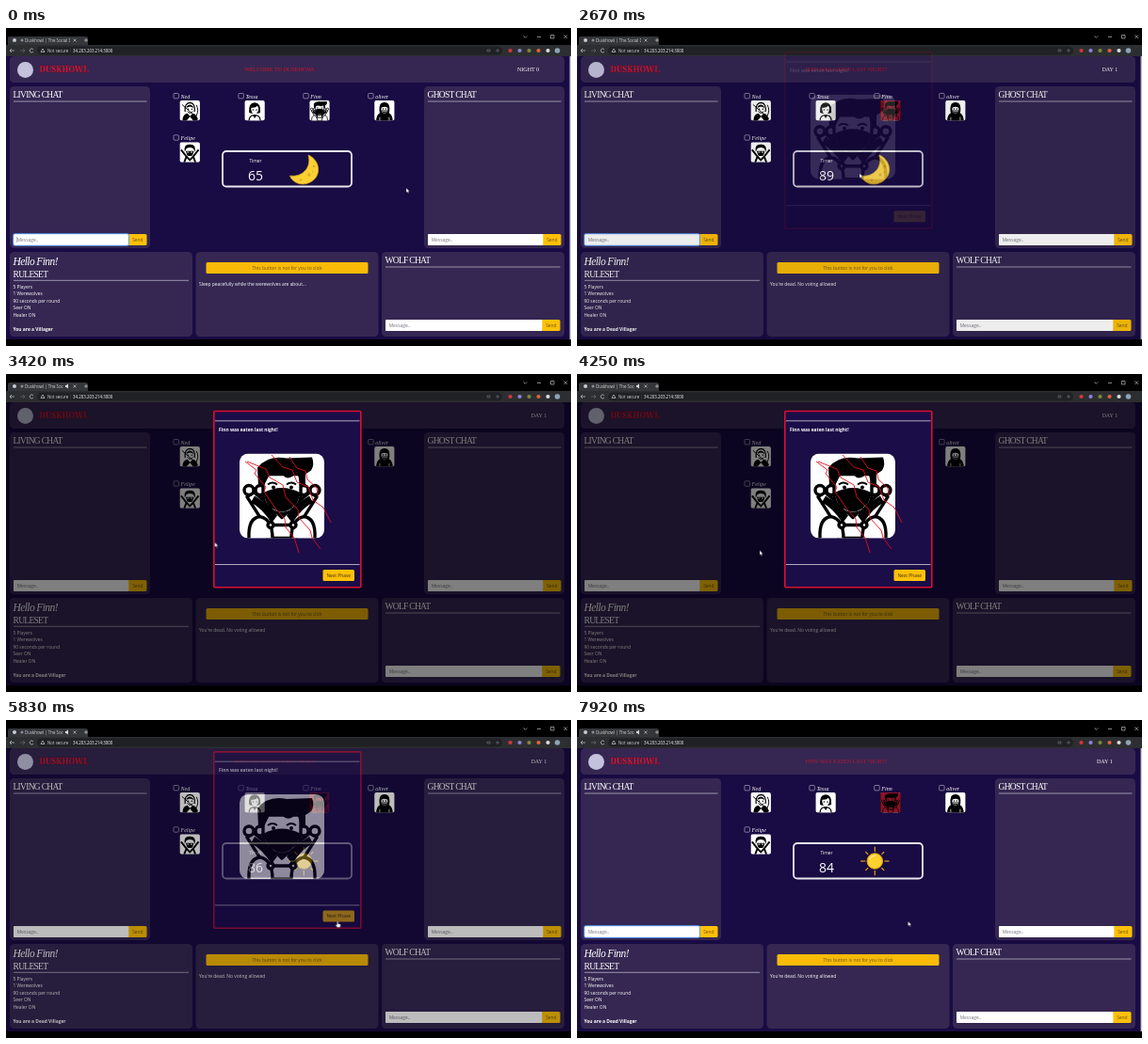
These frames come from a looping animation (600x338 px, 8000 ms). An HTML page:

```html
<!DOCTYPE html>
<html lang="en">
<head>
<meta charset="utf-8">
<title>Duskhowl</title>
<style>
  html, body { margin: 0; width: 100%; height: 100%; overflow: hidden; background: #000; }
  svg#stage { display: block; width: 100vw; height: 100vh; }
  text { font: 4.9px "Open Sans", "Noto Sans", sans-serif; fill: #fff; }
  .chrome text { font-size: 4.4px; fill: #d6d6d9; }
  .head { font: 9.5px "Liberation Serif", serif; letter-spacing: -.7px; }
  .hello { font: italic 11.5px "Liberation Serif", serif; letter-spacing: -.6px; }
  .name { font: italic 6px "Liberation Serif", serif; }
  .notice, .phase { font: 6px "Liberation Serif", serif; }
  .notice { fill: #d3132b; text-anchor: middle; animation: pulse 1.6s ease-in-out infinite alternate; }
  .logo { font: 900 8.5px "Noto Serif", serif; fill: #e4203c; stroke: #7a0820; stroke-width: .3px; }
  .bold { font-weight: 700; }
  .mid { text-anchor: middle; }
  .hint { fill: #777480; }
  .onGold { fill: #6b5210; }
  .digits text { font-size: 14px; text-anchor: middle; }

  .night, .day, .moon, .sun, .focus, .sound, .hand, .arrow, .dayShift, .bar { animation: 8s step-end infinite; }
  .night { animation-name: night; }
  .day { animation-name: day; }
  .moon { animation-name: moon; }
  .sun { animation-name: sun; }
  .focus, .bar { animation-name: focus; }
  .sound { animation-name: sound; }
  .hand { animation-name: hand; }
  .arrow { animation-name: arrow; }
  .dayShift { animation-name: dayShift; }
  .digits { animation: count 8s step-end infinite; }
  .caret { animation: blink 1s step-end infinite; }
  .backdrop { animation: shade 8s linear infinite; }
  .fade { animation: fade 8s linear infinite; }
  .drop { animation: drop 8s ease-out infinite; }
  .claws { animation: claws 8s linear infinite; }
  .pointer { animation: pointer 8s ease-in-out infinite; }

  @keyframes pulse { to { opacity: .82; } }
  @keyframes night { 0% { visibility: visible; } 32.25%, 100% { visibility: hidden; } }
  @keyframes day { 0% { visibility: hidden; } 32.25%, 100% { visibility: visible; } }
  @keyframes moon { 0% { visibility: visible; } 34.5%, 100% { visibility: hidden; } }
  @keyframes sun { 0% { visibility: hidden; } 34.5%, 100% { visibility: visible; } }
  @keyframes focus { 0% { visibility: visible; } 34.2% { visibility: hidden; } 75.75%, 100% { visibility: visible; } }
  @keyframes sound { 0% { visibility: hidden; } 36.5%, 100% { visibility: visible; } }
  @keyframes hand { 0% { visibility: hidden; } 69% { visibility: visible; } 75.5%, 100% { visibility: hidden; } }
  @keyframes arrow { 0% { visibility: visible; } 69% { visibility: hidden; } 75.5%, 100% { visibility: visible; } }
  @keyframes dayShift { 0% { transform: none; } 32.25% { transform: translateX(5.5px); } 75.75%, 100% { transform: none; } }
  @keyframes blink { 50%, 100% { opacity: 0; } }
  @keyframes count {
    0% { transform: none; }
    7.25% { transform: translateY(-20px); }
    19.75% { transform: translateY(-40px); }
    32.25% { transform: translateY(-60px); }
    44.75% { transform: translateY(-80px); }
    57.25% { transform: translateY(-100px); }
    69.75% { transform: translateY(-120px); }
    82.25% { transform: translateY(-140px); }
    94.75%, 100% { transform: translateY(-160px); }
  }
  @keyframes shade { 0%, 33.125% { opacity: 0; } 35%, 72% { opacity: .5; } 73.875%, 100% { opacity: 0; } }
  @keyframes fade { 0%, 33.125% { opacity: 0; } 35%, 72% { opacity: 1; } 73.875%, 100% { opacity: 0; } }
  @keyframes drop {
    0%, 33.125% { transform: translateY(-15.6px); }
    36.875%, 72% { transform: none; }
    75.75%, 100% { transform: translateY(-15.6px); }
  }
  @keyframes claws { 0%, 33.5% { opacity: 0; } 38%, 58% { opacity: 1; } 62.5%, 100% { opacity: 0; } }
  @keyframes pointer {
    0%, 6% { transform: translate(425px, 170px); }
    14%, 23% { transform: translate(450px, 180px); }
    31%, 35% { transform: translate(300px, 154.5px); }
    47%, 57% { transform: translate(194px, 187.5px); }
    68%, 100% { transform: translate(351.5px, 214px); }
  }
</style>
</head>
<body>
<svg id="stage" viewBox="0 0 600 338" preserveAspectRatio="none">
  <defs>
    <clipPath id="reel"><rect x="250" y="147" width="30" height="19"/></clipPath>
    <clipPath id="card"><rect width="90" height="90" rx="9"/></clipPath>

    <symbol id="masked" viewBox="0 0 90 90"><g clip-path="url(#card)">
      <rect width="90" height="90" fill="#fff"/>
      <g stroke="#000" stroke-width="3.4" stroke-linejoin="round" fill="#fff">
        <path d="M8 46 L15 41 L33 56 L45 68 L57 56 L75 41 L82 46 L68 68 L60 90 H30 L22 68Z"/>
        <circle cx="22" cy="39" r="5"/><circle cx="68" cy="39" r="5"/>
        <path d="M25 22 V46 Q28 62 45 64 Q62 62 65 46 V22Z"/>
        <circle cx="10" cy="39" r="5"/><circle cx="80" cy="39" r="5"/>
        <path d="M10 90 Q9 68 22 67 Q35 70 35 90 M80 90 Q81 68 68 67 Q55 70 55 90"/>
        <path d="M35 76 H55" /><circle cx="33" cy="76" r="3"/><circle cx="57" cy="76" r="3"/>
      </g>
      <path d="M20 34 L19 15 Q30 1 50 5 L77 4 Q80 12 76 18 L70 22 V34 L65 33 L61 20 Q52 30 46 23 Q38 19 32 22 L26 34Z"/>
      <path d="M25 42 Q45 31 65 42 L61 53 Q45 71 29 53Z M16 45 L34 57 L40 66 L34 74Q24 58 12 52Z M74 45 L56 57 L50 66 L56 74Q66 58 78 52Z"/>
      <path d="M30 33 q5 -4 10 0 M50 33 q5 -4 10 0" fill="none" stroke="#000" stroke-width="2"/>
      <circle cx="36" cy="36" r="2"/><circle cx="55" cy="36" r="2"/>
    </g></symbol>

    <symbol id="archer" viewBox="0 0 90 90"><g clip-path="url(#card)">
      <rect width="90" height="90" fill="#fff"/>
      <path d="M24 50 Q20 12 46 10 Q70 12 66 50" fill="#fff" stroke="#000" stroke-width="5"/>
      <path d="M30 34 Q46 20 62 34 L59 26 Q46 12 31 26Z M12 90 Q14 60 34 58 L46 70 L58 58 Q78 60 80 90Z"/>
      <path d="M34 48 q12 16 24 0 M10 18 L82 82 M74 20 Q88 44 72 72" fill="none" stroke="#000" stroke-width="4"/>
      <path d="M30 90 L46 72 L60 90Z" fill="#fff"/>
      <circle cx="38" cy="39" r="3"/><circle cx="54" cy="39" r="3"/>
    </g></symbol>

    <symbol id="girl" viewBox="0 0 90 90"><g clip-path="url(#card)">
      <rect width="90" height="90" fill="#fff"/>
      <path d="M20 54 Q16 10 45 9 Q74 10 70 54 L60 58 H30Z"/>
      <path d="M29 32 Q50 34 56 24 L62 34 Q62 58 45 60 Q28 58 29 32Z" fill="#fff"/>
      <path d="M20 90 Q20 66 45 65 Q70 66 70 90" fill="#fff" stroke="#000" stroke-width="5"/>
      <path d="M36 66 L45 80 L54 66Z"/>
      <circle cx="38" cy="42" r="3"/><circle cx="53" cy="42" r="3"/>
    </g></symbol>

    <symbol id="hooded" viewBox="0 0 90 90"><g clip-path="url(#card)">
      <rect width="90" height="90" fill="#fff"/>
      <path d="M8 90 Q10 62 24 56 Q16 8 45 8 Q74 8 66 56 Q80 62 82 90Z"/>
      <path d="M31 32 Q45 24 59 32 Q62 54 45 58 Q28 54 31 32Z" fill="#fff"/>
      <path d="M32 44 H58 Q56 56 45 57 Q34 56 32 44Z"/>
      <path d="M36 49 H54 M24 90 V74 M66 90 V74" stroke="#fff" stroke-width="3"/>
      <circle cx="39" cy="38" r="3"/><circle cx="51" cy="38" r="3"/>
    </g></symbol>

    <symbol id="bandit" viewBox="0 0 90 90"><g clip-path="url(#card)">
      <rect width="90" height="90" fill="#fff"/>
      <path d="M22 44 Q16 8 45 10 Q74 8 68 44 L60 28 Q45 20 30 28Z"/>
      <path d="M27 40 H63 L57 58 Q45 66 33 58Z"/>
      <path d="M6 34 L30 64 L20 90 M84 34 L60 64 L70 90 M30 64 L45 80 L60 64" fill="none" stroke="#000" stroke-width="8"/>
      <path d="M33 45 h9 M48 45 h9" stroke="#fff" stroke-width="4"/>
    </g></symbol>
  </defs>

  <rect width="600" height="338"/>

  <g class="chrome">
    <path d="M2 18 V11 Q2 9 4 9 H84 Q87 9 87 11 V18Z" fill="#35363a"/>
    <rect y="18" width="600" height="12" fill="#2d2e31"/>
    <rect x="33" y="19.5" width="494" height="9" rx="4.5" fill="#202124"/>
    <circle cx="9" cy="13" r="2" fill="#c9c9d2"/><circle cx="17" cy="13" r="1.5" fill="#8c8ca0"/>
    <svg x="20" y="8" width="48" height="10"><text x="0" y="6.5">Duskhowl | The Social Deduction</text></svg>
    <g class="sound"><rect x="61" y="9.5" width="8" height="8" fill="#35363a"/><path d="M63 12 h1 l2 -1.5 v5 l-2 -1.5 h-1z" fill="#ddd"/></g>
    <path d="M71.5 11.5 l3 3 m0 -3 l-3 3 M83 13 h4 M85 11 v4 M549.5 8.5 l1.8 1.8 l1.8 -1.8 M564 9.5 h4 M578.5 7.5 h3.5 v3.5 h-3.5z M592.5 7.5 l3.5 3.5 m0 -3.5 l-3.5 3.5" fill="none" stroke="#ddd" stroke-width=".6"/>
    <path d="M4 24 h5 M6 22 l-2 2 l2 2 M29 23 a2 2 0 1 0 0 2 M37 25.5 l2 -3.5 l2 3.5z" fill="none" stroke="#ccc" stroke-width=".7"/>
    <path d="M15 24 h5 M18 22 l2 2 l-2 2 M511 23 h3 v2 h-3z M520 24 h4 M522 22 v4" fill="none" stroke="#77787c" stroke-width=".6"/>
    <text x="44" y="25.6">Not secure</text><path d="M68.5 21.5 v5" stroke="#555" stroke-width=".4"/>
    <text x="71" y="25.6" style="fill:#fff">34.203.203.214:3000</text>
    <g id="extensions"></g>
  </g>

  <rect y="30" width="600" height="301" fill="#190b43"/>
  <rect class="bar" x="598.6" y="30" width="1.4" height="301" fill="#cfcfd6"/>
  <g id="panels" fill="#352752"></g>

  <circle cx="20.5" cy="44.5" r="8.5" fill="#c3c1dc"/>
  <text class="logo" x="35.5" y="47">DUSKHOWL</text>
  <g class="night">
    <text class="notice" x="291" y="46">WELCOME TO DUSKHOWL</text>
    <text class="phase" x="543" y="46">NIGHT 0</text>
    <text class="bold" x="7.5" y="322">You are a Villager</text>
    <text x="205" y="273.5">Sleep peacefully while the werewolves are about...</text>
  </g>
  <g class="day">
    <text class="notice" x="286" y="46">FINN WAS EATEN LAST NIGHT!</text>
    <text class="phase dayShift" x="552" y="46">DAY 1</text>
    <text class="bold" x="7.5" y="322">You are a Dead Villager</text>
    <text x="205" y="273.5">You're dead. No voting allowed</text>
  </g>

  <g id="chats"></g>
  <rect class="focus" x="7.7" y="218.7" width="122.6" height="12.6" rx="1.5" fill="none" stroke="#5b9bf5" stroke-width="1"/>
  <g class="focus"><path class="caret" d="M11.2 222 v6" stroke="#222" stroke-width=".4"/></g>

  <text class="hello" x="7.5" y="251.5">Hello Finn!</text>
  <text class="head" x="7.5" y="264.5">RULESET</text>
  <path d="M8 268.3 H194" stroke="#c9c5d4" stroke-width=".7"/>
  <g id="rules"></g>

  <rect x="212.5" y="249" width="172" height="12" rx="1.5" fill="#f9bb08"/>
  <text class="mid onGold" x="298.5" y="256.8">This button is not for you to click</text>

  <g id="players"></g>

  <rect x="230" y="131" width="137" height="37.5" rx="4" fill="none" stroke="#e9e8ee" stroke-width="1.8"/>
  <text class="mid" x="265" y="143">Timer</text>
  <g clip-path="url(#reel)"><g class="digits" id="digits"></g></g>
  <g class="moon">
    <path d="M321 135 C335 141 336 161 319 165.5 C310 167.5 303 162 301.5 157 C313 159 325 150 321 135Z" fill="#fbd034" stroke="#d7a21c" stroke-width=".8"/>
    <g fill="#dfa92a"><circle cx="327" cy="147" r="1.3"/><circle cx="322" cy="156" r="1.7"/><circle cx="313" cy="161.5" r="1.3"/><circle cx="326" cy="153" r=".8"/></g>
  </g>
  <g class="sun">
    <g id="rays" stroke="#f0ae1c" stroke-width="1.1"></g>
    <circle cx="316.3" cy="150" r="8.3" fill="#fdd02b" stroke="#e39b14" stroke-width=".9"/>
    <path d="M311 148 q2 -4 6 -4" fill="none" stroke="#fff0a0" stroke-width="1.2"/>
  </g>

  <rect class="backdrop" y="30" width="600" height="301"/>
  <g class="fade"><g class="drop">
    <rect x="220.8" y="39.5" width="156" height="187.3" rx="1" fill="#1b0d47" stroke="#d90f34" stroke-width="1.6"/>
    <path d="M222 49.8 H375.5 M222 202.5 H375.5" stroke="#d5d2df" stroke-width=".8"/>
    <text class="bold" x="226" y="60.8">Finn was eaten last night!</text>
    <use href="#masked" x="248" y="84.3" width="90" height="90.5"/>
    <g class="claws" fill="none" stroke="#e0101c" stroke-width=".9">
      <path d="M254 93 l12 9 l-2 4 l12 14 l-2 5 l13 19 l9 10 l1 9 l9 11 l5 16"/>
      <path d="M256 93 l20 8 l4 9 l14 8 l3 13 l13 13 l1 9 l12 13 l2 8 l9 12"/>
      <path d="M282 86 l12 13 l10 3 l5 13 l12 5 l5 14 l11 8 l8 16"/>
      <path d="M301 88 l8 12 l9 3 l2 9 l10 9 l1 8"/>
    </g>
    <rect x="336.5" y="208" width="33.5" height="12" rx="1.5" fill="#ffc107"/>
    <text class="mid" x="353.2" y="215.8" style="fill:#3c2f08">Next Phase</text>
  </g></g>

  <g class="pointer">
    <path class="arrow" d="M0 0 V5 L1.2 4 L2 5.8 L2.9 5.4 L2.1 3.7 L3.6 3.6Z" fill="#fff" stroke="#000" stroke-width=".3"/>
    <path class="hand" d="M0 0 q.8 -.6 1.2 .2 V2.4 L3.4 3 Q4 3.3 3.8 4.4 L3.2 6.6 H.3 L-1.4 4 Q-1 3 0 3.8Z" fill="#fff" stroke="#000" stroke-width=".3"/>
  </g>
</svg>
<script>
  const fill = (id, items, draw) => {
    document.getElementById(id).innerHTML = items.map(draw).join("");
  };

  fill("extensions", ["#d8343c", "#8d86d8", "#7d8a3a", "#e0643a", "#dddddd", "#8ea3b5"], (color, i) =>
    `<circle cx="${535.5 + i * 10}" cy="24" r="${i === 5 ? 2.8 : 2.1}" fill="${color}"/>`);

  fill("panels", [
    [4, 30, 589, 28], [4, 62, 149, 172], [444, 62, 149, 172],
    [4, 238, 194, 90], [201.5, 238, 194, 90], [399, 238, 194, 90]
  ], ([x, y, w, h]) => `<rect x="${x}" y="${y}" width="${w}" height="${h}" rx="4.5"/>`);

  // Title, rule, message field and send button of each chat
  fill("chats", [
    ["LIVING CHAT", 8, 74.3, 141.5, 219], ["GHOST CHAT", 448, 74.3, 141.5, 219], ["WOLF CHAT", 403, 250.3, 185.5, 310]
  ], ([title, x, y, w, top]) => `
    <text class="head" x="${x - .5}" y="${y}">${title}</text>
    <path d="M${x} ${y + 3.7} h${w}" stroke="#c9c5d4" stroke-width=".7"/>
    <rect x="${x}" y="${top}" width="${w}" height="12" rx="1.5" fill="#ffc107"/>
    <rect x="${x}" y="${top}" width="${w - 19.2}" height="12" rx="1" fill="#fff"/>
    <text class="hint" x="${x + 3.7}" y="${top + 7.7}">Message..</text>
    <text class="mid onGold" x="${x + w - 9.6}" y="${top + 7.7}">Send</text>`);

  fill("rules", ["5 Players", "1 Werewolves", "90 seconds per round", "Seer ON", "Healer ON"],
    (rule, i) => `<text x="7.5" y="${276.7 + i * 7.5}">${rule}</text>`);

  fill("players", [
    ["Ned", "archer"], ["Tessa", "girl"], ["Finn", "masked"], ["oliver", "hooded"], ["Felipe", "bandit"]
  ], ([name, face], i) => {
    const x = 178 + (i % 4) * 68.9, y = 69.5 + Math.floor(i / 4) * 44.3;
    const blood = face === "masked"
      ? `<rect class="day" x="${x + 6.2}" y="${y + 7.5}" width="22" height="21.5" rx="2.2" fill="#8e1226" style="mix-blend-mode:multiply"/>` : "";
    return `<rect x="${x}" y="${y}" width="5.4" height="5.4" rx=".8" fill="none" stroke="#c4c0d2" stroke-width=".6"/>
      <text class="name" x="${x + 7.5}" y="${y + 5}">${name}</text>
      <use href="#${face}" x="${x + 6.2}" y="${y + 7.5}" width="22" height="21.5"/>${blood}`;
  });

  fill("digits", [65, 64, 63, 89, 88, 87, 86, 85, 84],
    (n, i) => `<text x="265" y="${162.3 + i * 20}">${n}</text>`);

  fill("rays", [...Array(8).keys()], i =>
    `<path d="M10 0 H${i % 2 ? 14 : 15.2}" transform="translate(316.3 150) rotate(${i * 45})"/>`);
</script>
</body>
</html>
```
